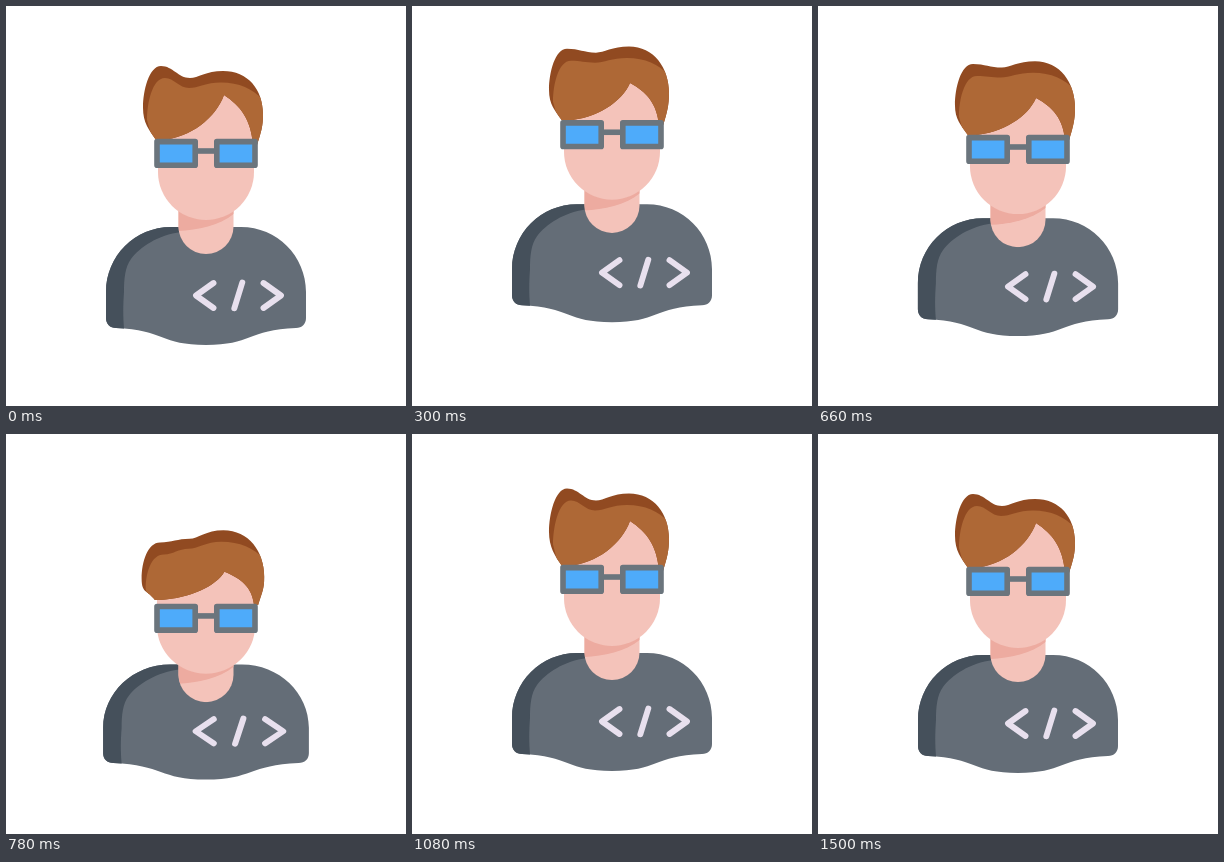
An HTML page for the animation above (3530 ms loop, 400 by 400 pixels).

```html
<!DOCTYPE html>
<html lang="en">
<head>
<meta charset="utf-8">
<title>Programmer</title>
<style>
  html, body { margin: 0; width: 100%; height: 100%; overflow: hidden; background: #fff; }
  svg { display: block; width: 100%; height: 100%; }
</style>
</head>
<body>
<svg viewBox="0 0 400 400">
  <clipPath id="hairClip"><path id="hairEdge"/></clipPath>
  <clipPath id="neckClip"><path d="M172.5 185H227.5V220.5A27.5 27.5 0 0 1 172.5 220.5Z"/></clipPath>
  <g id="body">
    <path fill="#646d77" d="M100 286C100 250 129 221 165 221H235C271 221 300 250 300 286V312C300 318 296 322 290 322C242 324 245 339 200 339C155 339 158 324 110 322C104 322 100 318 100 312Z"/>
    <path fill="#45505b" d="M118 322.6L110 322C104 322 100 318 100 312V286C100 250 129 221 165 221H175V226C152 229 134 241 125 253C119 261 118 273 118 286C117 300 117 310 118 322.6Z"/>
    <path fill="none" stroke="#e8e0ee" stroke-width="5.9" stroke-linecap="round" stroke-linejoin="round" d="M207.5 277L190 289.5L207.5 302M236.3 276.5L228.3 302.3M257.5 277L275 289.5L257.5 302"/>
  </g>
  <g id="neck" clip-path="url(#neckClip)">
    <path fill="#f4c3ba" d="M170 180H230V250H170Z"/>
    <path id="shade" fill="#edaba0" d="M170 170H230V206C214 220 192 224 170 225Z"/>
  </g>
  <g id="head">
    <path id="face" fill="#f4c3ba"/>
    <path id="hairBack" fill="#914a21"/>
    <path id="hair" fill="#ae6836" clip-path="url(#hairClip)"/>
  </g>
  <g id="glasses" fill="#4eabfa" stroke="#6b757d" stroke-width="5.6" stroke-linejoin="round">
    <path d="M188 145H212"/>
    <rect x="151" y="135.6" width="38.2" height="23.6"/>
    <rect x="210.8" y="135.6" width="38.2" height="23.6"/>
  </g>
</svg>
<script>
const LOOP = 3530, STEP = 30;

const ease = {
  out: u => 1 - (1 - u) ** 2,
  in: u => u * u,
  both: u => (1 - Math.cos(Math.PI * u)) / 2
};

// A jump: crouch, rise, fall, rebound and settle. The head trails the body.
const jump = (crouch, top, land) => [
  { t: 0, y: 0 },
  { ...crouch, ease: ease.both },
  { ...top, ease: ease.out },
  { ...land, ease: ease.in },
  { t: 1080, y: -2, ease: ease.both },
  { t: 1250, y: 2, ease: ease.both },
  { t: 1500, y: 0, ease: ease.both }
];
const bodyJump = jump({ t: 150, y: 8.5 }, { t: 440, y: -32.3 }, { t: 730, y: 8.5 });
const headJump = jump({ t: 205, y: 20 }, { t: 462, y: -44.3 }, { t: 745, y: 38 });

function height(keys, t) {
  const i = keys.findIndex(k => k.t > t);
  if (i < 0) return 0;
  const a = keys[i - 1], b = keys[i];
  return a.y + (b.y - a.y) * b.ease((t - a.t) / (b.t - a.t));
}

const ramp = (t, a, b) => ease.both(Math.min(1, Math.max(0, (t - a) / (b - a))));
const pulse = (t, a, peak, b) => ramp(t, a, peak) - ramp(t, peak, b);

const $ = id => document.getElementById(id);
const path = (id, d) => $(id).setAttribute("d", d);
const move = (id, y) => $(id).setAttribute("transform", `translate(0 ${y})`);
const squeeze = (id, y, sx, sy, cy) => $(id).setAttribute("transform",
  `translate(200 ${cy + y}) scale(${sx} ${sy}) translate(-200 ${-cy})`);

function hairOutline({ eye, brow, tuft, dip, crown, part }) {
  const left = eye + (tuft - eye) * .52, right = eye + (crown - eye) * .47;
  const gap = brow - part;
  return `M150 ${brow}C143 ${brow - 10} 137 ${left + 15} 137 ${left}
    C137 ${left - 17} 143 ${tuft} 155 ${tuft}
    C167 ${tuft} 172 ${dip} 184 ${dip}
    C192 ${dip} 200 ${crown} 217 ${crown}
    C242 ${crown} 257 ${right - 25} 257 ${right}
    C257 ${right + 12} 255 ${brow - 8} 251 ${brow + 5}H247
    C245 ${part + gap * .55} 235 ${part + gap * .25} 218 ${part}
    C210 ${part + gap * .5} 185 ${brow - 2} 155 ${brow}Z`;
}

function hairFront({ eye, tuft, dip, crown }) {
  const low = eye + (tuft - eye) * .38, top = tuft + 12, mid = dip + 10, peak = crown + 11.5;
  return `M150 ${eye}L141 ${low}C141 ${low - 16} 146 ${top} 159 ${top}
    C168 ${top} 173 ${mid} 183 ${mid}
    C192 ${mid} 200 ${peak} 215 ${peak}
    C233 ${peak} 247 ${peak + 6.5} 256 ${peak + 16.5}
    L262 ${eye}Z`;
}

function draw(t) {
  const body = height(bodyJump, t), head = height(headJump, t);
  const lag = head - body;
  const squash = pulse(t, 0, 150, 300) + 1.2 * pulse(t, 640, 800, 1060);
  const wind = ramp(t, 0, 200) - ramp(t, 900, 1050);
  const hairY = head - 3.5 * pulse(t, 920, 1080, 1260);

  squeeze("body", body, 1 + .025 * squash, 1 - .021 * squash, 280);
  squeeze("head", 0, 1 + .019 * squash, 1, 0);
  move("neck", body + .42 * lag);
  move("shade", .16 * lag);
  move("glasses", head);

  const hair = {
    eye: 147 + head,
    brow: 134 + head - .17 * lag,
    tuft: 60 + hairY + .4 * lag,
    dip: 72 + hairY - 7 * wind + .1 * lag,
    crown: 65 + hairY - 5.7 * wind,
    part: 89 + head + 6 * wind + .2 * lag
  };
  const outline = hairOutline(hair);
  path("hairBack", outline);
  path("hairEdge", outline);
  path("hair", hairFront(hair));

  const jaw = 166 + body + .61 * lag;
  path("face", `M152 ${jaw}V${hair.eye - 25}L180 ${hair.part}H232L248 ${hair.eye - 20}
    V${jaw}A48 48 0 0 1 152 ${jaw}Z`);
}

const start = performance.now();
function tick() {
  const t = (performance.now() - start) % LOOP;
  draw(Math.floor(t / STEP) * STEP);
  requestAnimationFrame(tick);
}
tick();
</script>
</body>
</html>
```
